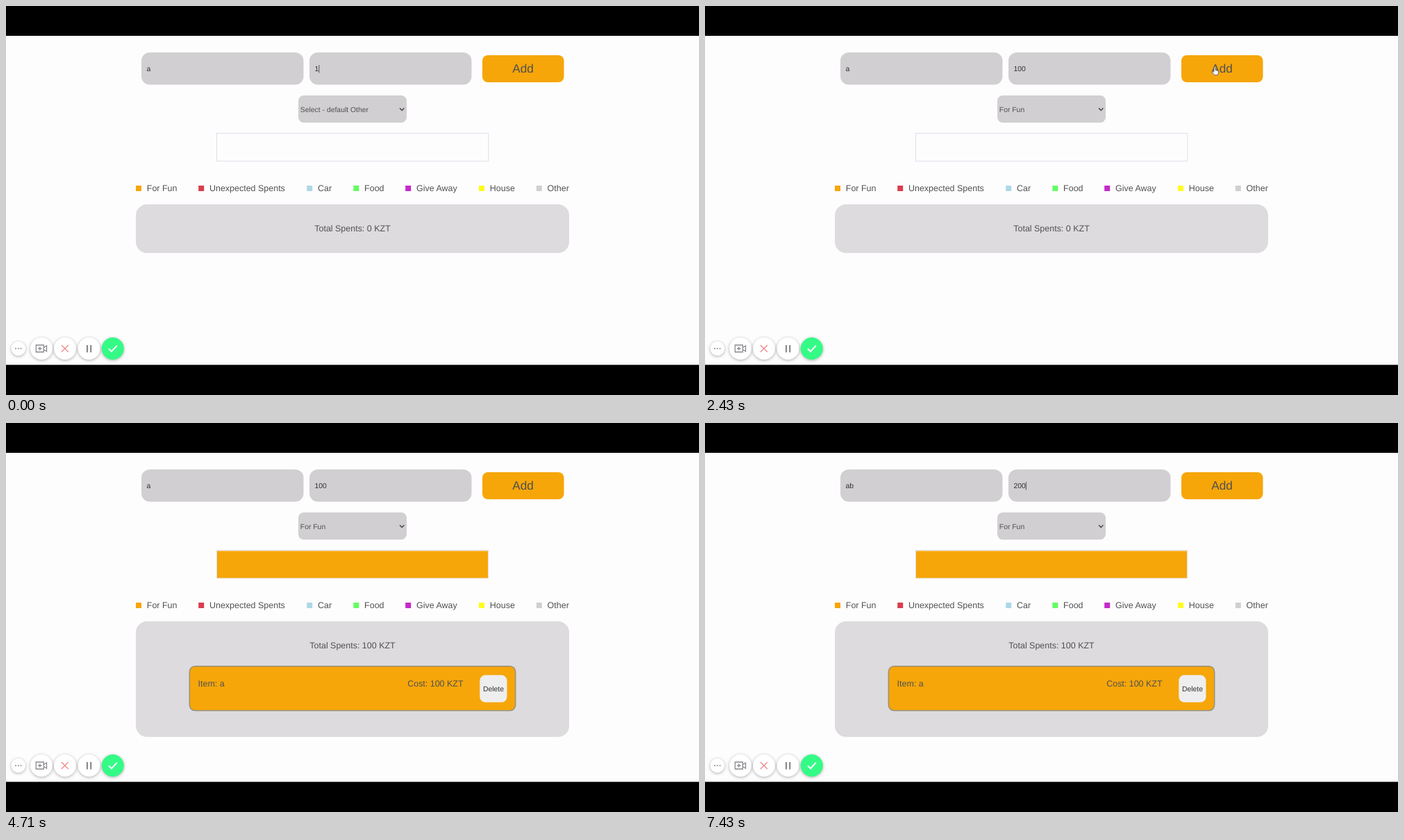
An HTML page for the animation above (8000 ms loop, 998 by 561 pixels).

```html
<!DOCTYPE html>
<html lang="en">
<head>
<meta charset="utf-8">
<title>Spending tracker</title>
<style>
  html, body { margin: 0; width: 100%; height: 100%; overflow: hidden; background: #000; }
  svg { display: block; width: 998px; height: 561px; }
  text { font-family: "Liberation Sans", Arial, sans-serif; font-size: 12.48px; fill: #505052; text-rendering: geometricPrecision; white-space: pre; }
  .small { font-size: 10.4px; }
  .dark { fill: #303032; }
  .field { fill: #d1cfd1; }
  .orange { fill: #f6a609; }
  .disc { fill: #fff; filter: drop-shadow(0 1px 2px rgba(0, 0, 0, .32)); }
  .icon { fill: none; stroke: #88898d; stroke-width: 1.3; }
  .pointer { fill: #fff; stroke: #66666a; stroke-width: .9; stroke-linejoin: round; }
</style>
</head>
<body>
<svg viewBox="0 0 998 561">
  <rect width="998" height="561"/>
  <rect y="43" width="998" height="474.5" fill="#fefdfe"/>

  <rect class="field" x="195" y="67" width="233.5" height="46.5" rx="12"/>
  <rect class="field" x="437" y="67" width="233.5" height="46.5" rx="12"/>
  <rect id="mark" x="444.5" y="84" width="17.4" height="13" fill="#3390ff"/>
  <text id="name" class="small dark" x="202.5" y="94"></text>
  <text id="price" class="small dark" x="444.5" y="94"></text>
  <rect id="caret" y="85" width="1" height="11.5" fill="#505052"/>

  <rect class="orange" x="686" y="71" width="117.5" height="39" rx="8"/>
  <text x="744.6" y="96.2" text-anchor="middle" style="font-size:17.2px">Add</text>

  <rect class="field" x="421" y="129" width="156" height="39.3" rx="8"/>
  <text id="choice" class="small" x="423.8" y="152.6"></text>
  <path d="M567 147.3l3.2 3.2l3.2-3.2" fill="none" stroke="#404042" stroke-width="1.3"/>

  <rect x="303.5" y="183.5" width="391.3" height="40.3" fill="#fefdfe" stroke="#dfdde8"/>
  <rect id="bar" class="orange" x="304" y="184.5" width="390" height="39"/>

  <g id="legend"></g>

  <rect id="panel" x="187" y="286" width="624" rx="16" fill="#dddbde"/>
  <text id="total" x="499" y="325.4" text-anchor="middle"></text>
  <g id="item">
    <rect class="orange" x="264.3" y="350.7" width="469.4" height="64" rx="8" stroke="#97917f" stroke-width="1.5"/>
    <text x="276.6" y="379.8">Item: a</text>
    <text x="578.2" y="379.8">Cost: 100 KZT</text>
    <rect x="682.3" y="363.6" width="39.2" height="39.2" rx="8" fill="#efeeef"/>
    <text class="small dark" x="701.9" y="386.6" text-anchor="middle">Delete</text>
  </g>

  <g id="tools">
    <circle class="disc" cx="17.8" cy="494" r="10.3"/>
    <circle class="disc" cx="51" cy="494" r="16"/>
    <circle class="disc" cx="85" cy="494" r="16"/>
    <circle class="disc" cx="119.6" cy="494" r="16"/>
    <circle class="disc" cx="153.8" cy="494" r="16" style="fill:#34fb86"/>
    <path class="icon" d="M13 494h2M16.8 494h2M20.6 494h2" stroke-width="2"/>
    <path class="icon" d="M43.3 489h11v10h-11zM54.5 492.5l4-2.5v8l-4-2.5M46 494h5.6M48.8 491.2v5.6"/>
    <path class="icon" d="M79.8 489l10 10M89.8 489l-10 10" style="stroke:#f08a8a"/>
    <path class="icon" d="M117 489v10.5M122.2 489v10.5" style="stroke-width:2.2"/>
    <path class="icon" d="M148 494.2l4 4l7.8-8.4" style="stroke:#fff;stroke-width:2"/>
  </g>

  <g id="mouse">
    <path id="arrow" class="pointer" d="M0 0V8.6L2 6.9L3.4 10L4.9 9.3L3.6 6.3H6.2Z"/>
    <path id="hand" class="pointer" d="M-1 1Q0-.6 1 1V5L4.2 5.7Q5.6 6 5.4 7.4L4.6 12H-.6L-3.8 7.6Q-3.4 6.2-2.2 7L-1 8Z"/>
    <path id="beam" d="M-2 0H2M0 0V11M-2 11H2" fill="none" stroke="#66666a"/>
  </g>
</svg>
<script>
const LOOP = 8000, GLYPH = 5.785;
const FIELD_X = { name: 202.5, price: 444.5 };
const $ = id => document.getElementById(id);
const show = (id, on) => { $(id).style.display = on ? "" : "none"; };

const legend = [
  ["For Fun", 187, "#f6a609"], ["Unexpected Spents", 277.2, "#d73f4e"],
  ["Car", 433.2, "#add8e6"], ["Food", 500.3, "#66fb66"],
  ["Give Away", 575.2, "#c42bc9"], ["House", 681, "#fffb20"], ["Other", 763.8, "#d1cfd1"]
];
$("legend").innerHTML = legend.map(([label, x, color]) =>
  `<rect x="${x}" y="259" width="8" height="8" fill="${color}"/><text x="${x + 15.8}" y="267.3">${label}</text>`
).join("");

// Each step changes part of the state and holds until the next one.
const steps = [
  [0, { name: "a", price: "1", caret: "price", choice: "Select - default Other", added: false, mark: false, mouse: null }],
  [430, { price: "10" }],
  [570, { price: "100" }],
  [860, { mouse: [528, 164, "arrow"] }],
  [1000, { caret: null, mouse: [506.5, 156.5, "arrow"] }],
  [1290, { mouse: [501, 163, "arrow"] }],
  [1430, { mouse: [495.5, 168, "arrow"] }],
  [1710, { choice: "For Fun" }],
  [1860, { mouse: [530, 158, "arrow"] }],
  [2000, { mouse: [600, 135, "arrow"] }],
  [2140, { mouse: [676, 108, "arrow"] }],
  [2290, { mouse: [724, 92, "hand"] }],
  [2430, { mouse: [734, 87.5, "hand"] }],
  [2570, { added: true }],
  [3000, { mouse: [700, 90, "hand"] }],
  [3140, { mouse: [590, 90, "beam"] }],
  [3290, { mouse: [450, 88, "beam"] }],
  [3430, { mouse: [320, 86, "beam"] }],
  [3570, { mouse: [240, 86, "beam"] }],
  [3710, { mouse: [216, 86, "beam"], caret: "name" }],
  [4000, { mouse: null, caret: null }],
  [4290, { caret: "name" }],
  [4710, { caret: null }],
  [5000, { name: "ab", caret: "name" }],
  [5570, { caret: null, mark: true }],
  [5860, { mark: false, price: "", caret: "price" }],
  [6000, { price: "1" }],
  [6430, { caret: null }],
  [6860, { caret: "price" }],
  [7000, { price: "" }],
  [7140, { price: "2" }],
  [7290, { price: "20" }],
  [7430, { price: "200" }]
];

function stateAt(time) {
  const past = steps.filter(([start]) => start <= time + 0.5);
  return Object.assign({}, ...past.map(([, change]) => change));
}

function draw(time) {
  const s = stateAt(time);
  for (const id of ["name", "price", "choice"]) $(id).textContent = s[id];
  $("total").textContent = `Total Spents: ${s.added ? 100 : 0} KZT`;
  $("panel").setAttribute("height", s.added ? 166.8 : 70.2);
  $("price").style.fill = s.mark ? "#fff" : "";
  show("mark", s.mark);
  show("bar", s.added);
  show("item", s.added);
  show("caret", s.caret);
  if (s.caret) $("caret").setAttribute("x", FIELD_X[s.caret] + s[s.caret].length * GLYPH);
  show("mouse", s.mouse);
  if (s.mouse) {
    const [x, y, kind] = s.mouse;
    $("mouse").setAttribute("transform", `translate(${x} ${y})`);
    for (const id of ["arrow", "hand", "beam"]) show(id, id === kind);
  }
}

const began = performance.now();
function tick() {
  draw((performance.now() - began) % LOOP);
  requestAnimationFrame(tick);
}
tick();
</script>
</body>
</html>
```
